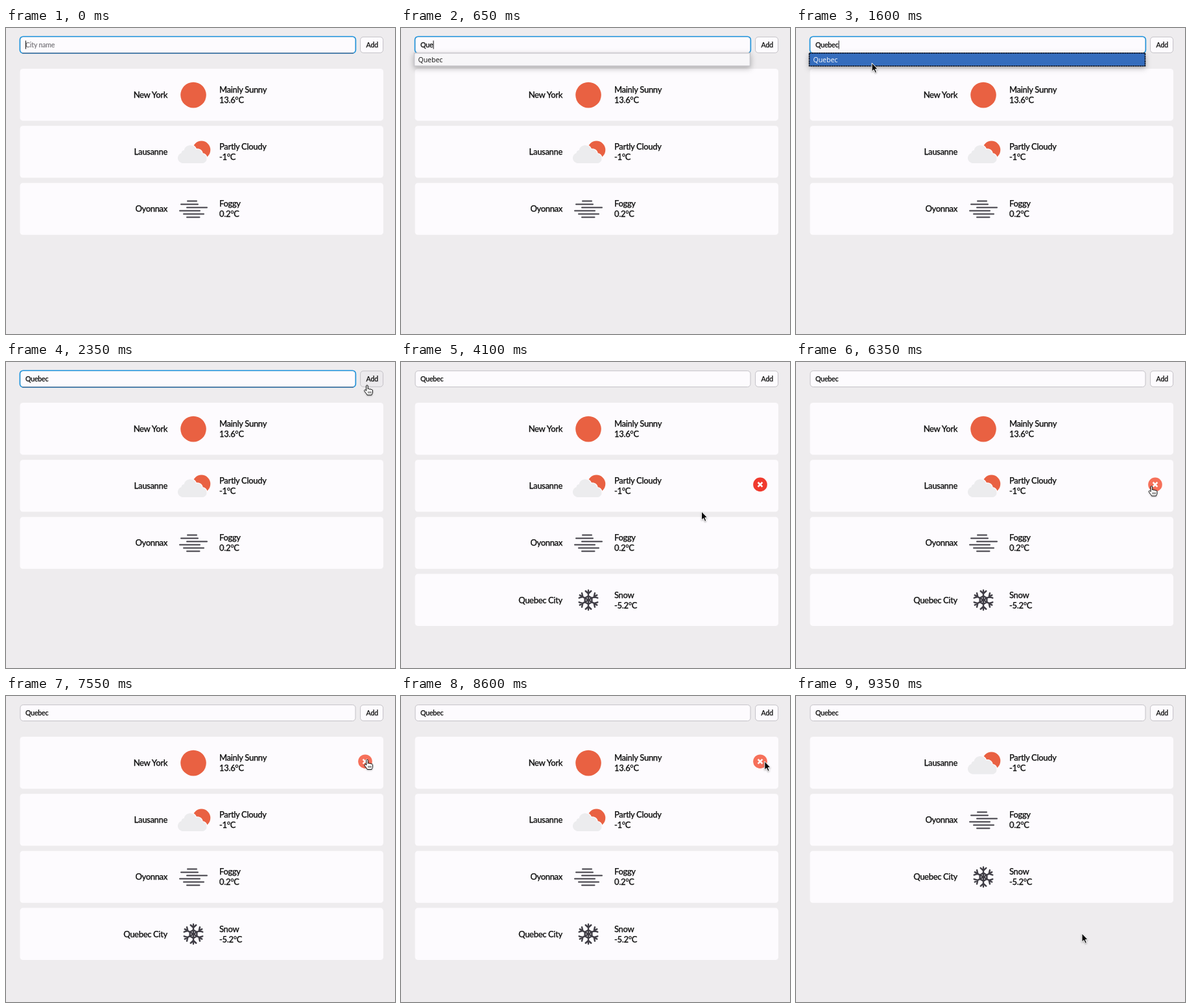
An HTML page that plays this animation: 600 px wide and 473 px high, repeating every 9.4 s.

```html
<!DOCTYPE html>
<html lang="en">
<head>
<meta charset="utf-8">
<title>Weather list</title>
<style>
html, body { margin: 0; width: 100%; height: 100%; overflow: hidden; background: #eeecee; }
svg { display: block; width: 600px; height: 473px; }
text { font: 500 13px Lato, sans-serif; letter-spacing: -.33px; fill: #111; stroke: #111; stroke-width: .25px; }
.small { font-size: 10.5px; letter-spacing: -.15px; }
.hint { fill: #77757a; stroke: #77757a; stroke-width: .1px; }
.option { font: 400 10.5px "Open Sans", sans-serif; letter-spacing: 0; stroke: none; }
.end { text-anchor: end; }
.card { fill: #fdfbfe; }
.box { fill: #fdfbfe; stroke: #c3c1c6; }
.line { fill: none; stroke: #403e46; stroke-linecap: round; }
#list { filter: drop-shadow(0 3px 4px rgba(0, 0, 0, .28)); }
#pointer { filter: drop-shadow(0 1px 1px rgba(0, 0, 0, .3)); }
</style>
</head>
<body>
<svg viewBox="0 0 600 473">
  <rect width="600" height="473" fill="#eeecee"/>
  <g id="rows"></g>

  <rect class="box" x="22" y="13.7" width="517" height="24.8" rx="4.5"/>
  <g id="ring" fill="none">
    <rect x="21.4" y="13.2" width="518" height="25.8" rx="5" stroke="#2196de" stroke-width="1.6"/>
    <path d="M25 38.9H536" stroke="#52698a" stroke-width="1.3"/>
  </g>
  <text id="hint" class="small hint" x="30" y="29.8">City name</text>
  <text id="typed" class="small" x="30" y="29.8"></text>
  <rect id="caret" y="19.5" width="1" height="13" fill="#111"/>

  <rect id="add" class="box" x="546.6" y="13.9" width="35" height="24.4" rx="4.5"/>
  <text class="small" x="555.6" y="29.8">Add</text>

  <g id="list">
    <rect id="choice" x="20.5" y="38.7" width="518" height="20" stroke="#0c1322" stroke-width="1.6"/>
    <text id="option" class="option" x="26.5" y="52.6">Quebec</text>
  </g>

  <g id="pointer">
    <path id="arrow" d="M0 0V13.2L3 10.6 5.2 15.4 7.4 14.4 5.3 9.7H9.3Z" fill="#0a0a0a" stroke="#fff"/>
    <g id="hand" stroke="#111">
      <path fill="#fff" d="M-1.3 1C-1.3-.6 1.2-.6 1.2 1V6C1.4 4.8 3.6 5 3.6 6.5 4 5.3 6 5.5 6 7 6.5 6 8.4 6.3 8.4 8V11C8.4 13 7 13.5 7 15H0C0 13.5-4 10-4.3 8.3-4.5 7-3 6.6-2.2 7.5L-1.3 8.5Z"/>
      <path fill="none" stroke-width=".8" d="M1.8 9.5v3M3.8 9.5v3M5.8 9.5v3"/>
    </g>
  </g>
</svg>

<script>
const LOOP = 9400, STEP = 50;
const CITY = 'Quebec';
const KEYS = [350, 500, 650, 800, 920, 1050];
const LIST_ON = 400, PICKED = 1800, CARET_OFF = 1950, ADDED = 2900, REMOVED = 8780;
const ROW_TOP = 103.2, PITCH = 88.2, HALF = 40.2;
const BUTTON_X = 554;

// time, x, y of the pointer tip
const PATH = [
  [1200, 122, 82], [1500, 117, 54], [1850, 117, 54], [2300, 557, 36], [3780, 557, 36],
  [4100, 463.5, 231], [4600, 450, 352], [4850, 450, 350], [5600, 515, 128], [5800, 525, 125],
  [6200, 548.5, 192], [6850, 548.5, 192], [7250, 552, 104], [7450, 552, 104], [7800, 578, 76],
  [8150, 574, 112], [8400, 573, 98], [8600, 560.8, 101], [8680, 556, 102], [8850, 556, 102],
  [9300, 441, 354], [9350, 441, 367]
];

const sun = '<circle cx="289" cy=".4" r="19.8" fill="#e96142"/>';

const cloudShape = 'M272 17.5a8 8 0 0 1-1.4-15.6 4.5 4.5 0 0 1 4-4.3A9.6 9.6 0 0 1 293.2-3.5' +
  'A7.2 7.2 0 0 1 302.5 2.8 7.6 7.6 0 0 1 304.5 17.5Z';
const cloud = '<circle cx="301.5" cy="-3" r="13.8" fill="#e96142"/>' +
  `<path d="${cloudShape}" fill="#fdfbfe" stroke="#fdfbfe" stroke-width="2.6"/>` +
  `<path d="${cloudShape}" fill="#ececee"/>`;

const bars = [[280, 294], [270, 296], [279, 310], [268, 299], [274, 305], [279, 298.5]];
const fog = `<path class="line" stroke-width="2" d="${
  bars.map(([a, b], i) => `M${a} ${-12 + i * 5}H${b}`).join('')}"/>`;

const arm = i => `<path transform="rotate(${i * 60})" d="M0 0V-15.3M-4.3-14 0-10 4.3-14M0-6.2 5.37-3.1"/>`;
const snow = '<g class="line" stroke-width="2.4" transform="translate(289 .2)">' +
  [0, 1, 2, 3, 4, 5].map(arm).join('') + '</g>';

const CITIES = [
  ['New York', sun, 'Mainly Sunny', '13.6°C'],
  ['Lausanne', cloud, 'Partly Cloudy', '-1°C'],
  ['Oyonnax', fog, 'Foggy', '0.2°C'],
  ['Quebec City', snow, 'Snow', '-5.2°C']
];

const $ = id => document.getElementById(id);
const show = (el, on) => el.setAttribute('visibility', on ? 'inherit' : 'hidden');
const move = (el, x, y) => el.setAttribute('transform', `translate(${x} ${y})`);

$('rows').innerHTML = CITIES.map(([name, icon, sky, temp]) => `<g>
  <rect class="card" x="21.6" y="${-HALF}" width="560.4" height="${HALF * 2}" rx="4.5"/>
  <text class="end" x="249" y="4.8">${name}</text>${icon}
  <text x="329" y="-3.2">${sky}</text><text x="329" y="12.8">${temp}</text>
  <g class="remove"><circle cx="${BUTTON_X}" cy="-2" r="10.8"/>
    <path d="M550.6-5.4l6.8 6.8m0-6.8l-6.8 6.8" stroke="#fff" stroke-width="2.5"/></g>
</g>`).join('');
const rows = [...$('rows').children].map(el => {
  const button = el.querySelector('.remove');
  return { el, button, disc: button.firstChild };
});

function pointerAt(t) {
  if (t < PATH[0][0]) return null;
  const i = PATH.findIndex(p => p[0] > t);
  if (i < 0) return PATH[PATH.length - 1].slice(1);
  const [t0, x0, y0] = PATH[i - 1], [t1, x1, y1] = PATH[i];
  const u = (t - t0) / (t1 - t0), k = u * u * (3 - 2 * u);
  return [x0 + (x1 - x0) * k, y0 + (y1 - y0) * k];
}

function drawRows(t, x, y) {
  const first = t >= REMOVED ? 1 : 0, last = t >= ADDED ? 3 : 2;
  let press = false;
  rows.forEach(({ el, button, disc }, i) => {
    const on = i >= first && i <= last, cy = ROW_TOP + (i - first) * PITCH;
    const inside = on && x > 21 && x < 582 && Math.abs(y - cy) < HALF;
    const gap = Math.hypot(x - BUTTON_X, y - cy + 2);
    show(el, on);
    move(el, 0, cy);
    show(button, inside);
    disc.setAttribute('fill', gap < 11 ? '#f6705a' : '#f03a2e');
    if (inside && gap < 6.5) press = true;
  });
  return press;
}

function draw(t) {
  const tip = pointerAt(t), [x, y] = tip || [-99, -99];
  const overAdd = x > 546 && x < 582 && y > 13 && y < 39;
  const onButton = drawRows(t, x, y);
  const count = KEYS.filter(k => k <= t).length;

  $('typed').textContent = CITY.slice(0, count);
  show($('hint'), !count);
  $('caret').setAttribute('x', 30 + (count ? $('typed').getComputedTextLength() + .2 : 0));
  show($('caret'), t < CARET_OFF);
  show($('ring'), t < ADDED);

  const picked = y > 38 && y < 60;
  show($('list'), t >= LIST_ON && t < PICKED);
  $('choice').setAttribute('fill', picked ? '#356dbd' : '#f7f6f8');
  $('choice').setAttribute('stroke', picked ? '#0c1322' : '#c9c8cc');
  $('choice').setAttribute('stroke-dasharray', picked ? '3 .6' : 'none');
  $('option').style.fill = picked ? '#fff' : '#111';

  $('add').style.fill = overAdd ? '#eceaed' : '';
  show($('pointer'), tip);
  move($('pointer'), x, y);
  show($('hand'), overAdd || onButton);
  show($('arrow'), !(overAdd || onButton));
}

const start = performance.now();
function tick() {
  const t = (performance.now() - start) % LOOP;
  draw(Math.floor(t / STEP) * STEP);
  requestAnimationFrame(tick);
}
tick();
</script>
</body>
</html>
```
